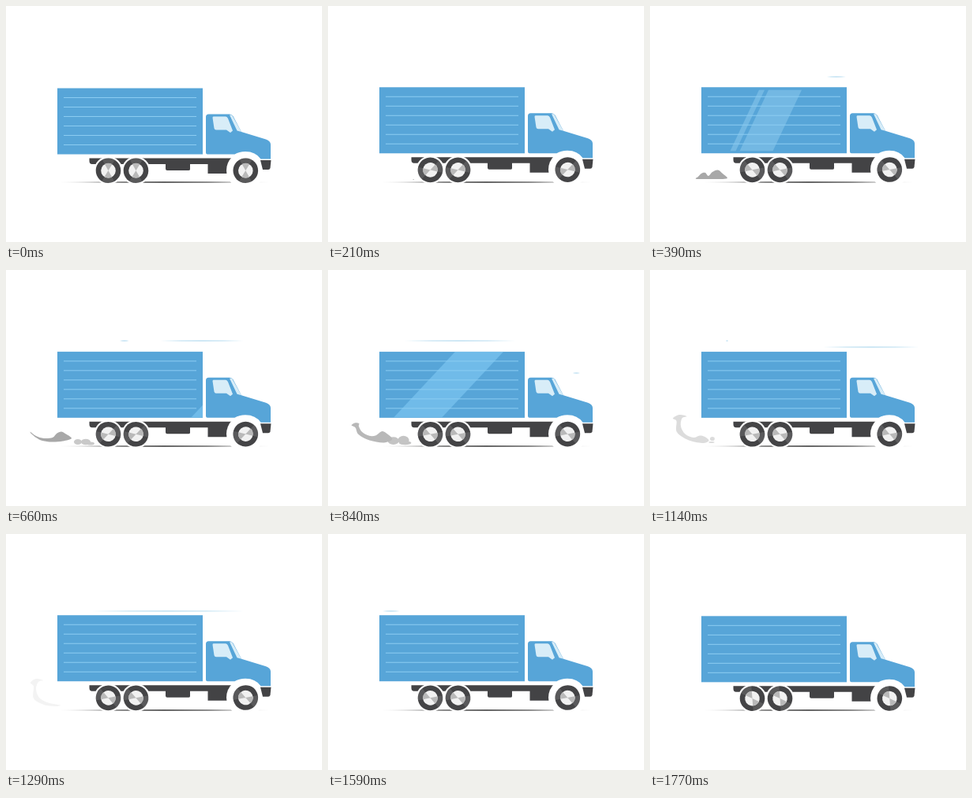
These frames come from a looping animation (400 by 300 pixels, 1800 ms). An HTML page:

```html
<!DOCTYPE html>
<html lang="en">
<head>
<meta charset="utf-8">
<title>Delivery truck</title>
<style>
  html, body { margin: 0; width: 100%; height: 100%; overflow: hidden; background: #fff; }
  svg { display: block; width: 100vw; height: 100vh; }
</style>
</head>
<body>
<svg viewBox="0 0 400 300">
  <defs>
    <linearGradient id="ground">
      <stop offset="0" stop-color="#333" stop-opacity=".1"/>
      <stop offset=".3" stop-color="#333"/>
      <stop offset=".7" stop-color="#333"/>
      <stop offset="1" stop-color="#333" stop-opacity=".1"/>
    </linearGradient>
    <clipPath id="boxClip"><rect x="65" y="104.5" width="184" height="84"/></clipPath>
    <clipPath id="panelClip"><rect x="65" y="108" width="184" height="77.5"/></clipPath>
    <g id="wheel">
      <circle r="15.8" fill="#444446"/>
      <path d="M0 0L-8 -13.6A15.8 15.8 0 0 1 8 -13.6L-8 13.6A15.8 15.8 0 0 0 8 13.6Z" fill="#999" opacity=".25"/>
      <circle r="9.3" fill="#f1f1f1"/>
      <path d="M0 0L-4.7 -8A9.3 9.3 0 0 1 4.7 -8L-4.7 8A9.3 9.3 0 0 0 4.7 8Z" fill="#b9b9b9"/>
    </g>
  </defs>

  <g id="wind" fill="#cfe8f5"></g>
  <g id="smoke">
    <g id="puffs"></g>
    <path id="swirl" fill="#999"/>
  </g>
  <path d="M65 224Q200 222.6 336 224Q200 225.4 65 224Z" fill="url(#ground)"/>

  <g id="truck">
    <path d="M105.5 193.5H292V213H255.5V201H233V207.5Q233 209 231 209H204Q202 209 202 207V201H109Q105.5 201 105.5 197Z" fill="#434345"/>
    <circle cx="303" cy="209" r="24" fill="#fff"/>
    <path d="M322 196H335.5L334.5 206Q334 208 332 208H325Z" fill="#434345"/>
    <path d="M253 141Q253 137.5 256.500 137.500H283Q286 137.500 287.500 140L298 160L329 169.500Q335 171.500 335 176V194.500H322.500Q316 185 303 185Q295 185 289.500 188.500H255Q253 188.500 253 186.500Z" fill="#57a5d8"/>
    <path d="M262.500 140.500H278Q280 140.500 281 143L287 158.500L284 161L279 157.500H266Q264 157.500 263.500 155.500L261.500 142Q261.500 140.500 262.500 140.500Z" fill="#d8edf8"/>
    <path d="M283 138.500H286L298 160L292.500 158.500Z" fill="#d8edf8"/>
    <rect x="65" y="104.500" width="184" height="84" fill="#57a5d8"/>
    <g clip-path="url(#panelClip)"><path id="stripes" fill="#73b8e3"/></g>
    <g clip-path="url(#boxClip)"><path id="gleam" fill="#70bbe9"/></g>
    <path d="M73 116.500h168m-168 12h168m-168 12h168m-168 12h168m-168 12h168m-168 12h168" stroke="#8ccdf2" fill="none"/>
  </g>
  <g id="wheels"></g>
</svg>

<script>
const LOOP = 1800;
const $ = id => document.getElementById(id);
const lerp = (a, b, k) => a + (b - a) * k;
const span = (t, a, b) => Math.min(1, Math.max(0, (t - a) / (b - a)));
const ease = k => k * k * (3 - 2 * k);

function add(parent, tag, attrs = {}) {
  const el = document.createElementNS('http://www.w3.org/2000/svg', tag);
  return $(parent).appendChild(set(el, attrs));
}

function set(el, attrs) {
  for (const name in attrs) el.setAttribute(name, attrs[name]);
  return el;
}

// Each streak stretches from its right end and contracts at its left end.
const streaks = [
  { y: 90, from: 248, to: 144, head: [300, 590], tail: [400, 730] },
  { y: 90, from: 302, to: 96, head: [520, 795], tail: [640, 1180] },
  { y: 131, from: 319, to: 180, head: [800, 1060], tail: [980, 1230] },
  { y: 98, from: 341, to: 69, head: [904, 1412], tail: [1169, 1680] }
].map(s => ({ ...s, el: add('wind', 'path') }));

const wheels = [
  { x: 129.5, lift: 1.3 },
  { x: 164.5, lift: 1.3 },
  { x: 303.3, lift: 1.8 }
].map(w => ({ ...w, el: add('wheels', 'g') }));
for (const w of wheels) {
  set(w.el, {}).innerHTML = '<circle r="18" fill="#fff"/><use href="#wheel"/>';
}

// Outlines run along the upper edge, around the puff and back underneath.
const swirlTimes = [390, 660, 990, 1290];
const swirlPoses = [
  '58,219 61,217 65,213 70,212 74,216 79,211 86,208.5 92,213 98,218.5 92,220 82,220 72,220 64,220 59,220',
  '31,206 38,211 48,214 59,213 64,208 70,205.5 75,208 83,214 72,217.5 58,218.5 46,217 38,213 33,209 31,207',
  '46,186 40,189 40,200 47,209 58,212 66,205 73,207 80,216 70,221 48,215 33,203 32,190 27,188 36,184',
  '47,186 41,188 38,197 42,208 52,214 60,216 66,217 69,218 62,219 48,217 35,209 35,194 31,189 38,184'
].map(pose => pose.split(' ').map(p => p.split(',').map(Number)));

const lumps = [
  { from: [91, 218.5, 5, 3.5], to: [76, 216, 9, 6] },
  { from: [101, 218.5, 6, 3.8], to: [91, 214.5, 8, 7] },
  { from: [107, 220.5, 5, 2], to: [90, 219, 10, 3] }
].map(l => ({ ...l, el: add('puffs', 'ellipse') }));

function smoothPath(points) {
  const n = points.length, at = i => points[(i + n) % n];
  let d = `M${at(0)}`;
  for (let i = 0; i < n; i++) {
    const [a, b, c, e] = [at(i - 1), at(i), at(i + 1), at(i + 2)];
    const c1 = b.map((v, j) => v + (c[j] - a[j]) / 6);
    const c2 = c.map((v, j) => v - (e[j] - b[j]) / 6);
    d += `C${c1} ${c2} ${c}`;
  }
  return d + 'Z';
}

function swirlAt(t) {
  if (t < swirlTimes[0]) {
    const k = ease(span(t, 180, swirlTimes[0]));
    return swirlPoses[0].map(([x, y]) => [lerp(110, x, k), lerp(221, y, k)]);
  }
  let i = 0;
  while (i < 2 && t > swirlTimes[i + 1]) i++;
  const k = span(t, swirlTimes[i], swirlTimes[i + 1]);
  return swirlPoses[i].map((p, n) => p.map((v, j) => lerp(v, swirlPoses[i + 1][n][j], k)));
}

function drawSmoke(t) {
  const fade = t < 660 ? 0.85 : t < 990
    ? lerp(0.85, 0.56, span(t, 660, 990))
    : lerp(0.56, 0.12, span(t, 990, 1290)) - 0.12 * span(t, 1290, 1440);
  set($('smoke'), { opacity: t < 180 ? 0 : fade });
  set($('swirl'), { d: smoothPath(swirlAt(t)) });

  const grow = ease(span(t, 500, 660));
  const drift = span(t, 660, 990);
  const shrink = 1 - ease(span(t, 1000, 1240));
  const gray = Math.round(lerp(192, 153, drift));
  for (const l of lumps) {
    const [x, y, rx, ry] = l.from.map((v, i) => lerp(v, l.to[i], drift));
    set(l.el, {
      cx: lerp(112, x, grow) - 20 * span(t, 990, 1240),
      cy: lerp(222, y, grow),
      rx: rx * grow * shrink,
      ry: ry * grow * shrink,
      fill: `rgb(${gray},${gray},${gray})`
    });
  }
}

function drawWind(t) {
  for (const s of streaks) {
    const left = lerp(s.from, s.to, ease(span(t, ...s.head)));
    const right = lerp(s.from, s.to, ease(span(t, ...s.tail)));
    const mid = (left + right) / 2;
    set(s.el, {
      d: right - left < 0.5 ? '' :
        `M${left} ${s.y}Q${mid} ${s.y - 1.8} ${right} ${s.y}Q${mid} ${s.y + 1.8} ${left} ${s.y}Z`
    });
  }
}

// A slanted band across the box; x is its left edge at the bottom.
const band = (x, width, slope) =>
  `M${x} 188.5h${width}l${84 * slope} -84h${-width}Z`;

function drawShine(t) {
  const x = 101 - (t - 390) * 0.84;
  const showStripes = t > 190 && t < 580;
  set($('stripes'), { d: showStripes ? band(x, 7, 0.47) + band(x + 12, 42, 0.47) : '' });
  const gleamX = 235 - (t - 660) * 0.84;
  const showGleam = t > 630 && t < 1070;
  set($('gleam'), { d: showGleam ? band(gleamX, 61, 0.93) : '' });
}

function draw(t) {
  const bounce = Math.sin(Math.PI * t / 300) ** 2;
  set($('truck'), { transform: `translate(0 ${-1.9 * bounce})` });
  for (const w of wheels) {
    set(w.el, { transform: `translate(${w.x} ${209.2 - w.lift * bounce}) rotate(${t * 1.2})` });
  }
  drawWind(t);
  drawSmoke(t);
  drawShine(t);
}

const start = performance.now();
function tick() {
  draw((performance.now() - start) % LOOP);
  requestAnimationFrame(tick);
}
tick();
</script>
</body>
</html>
```
